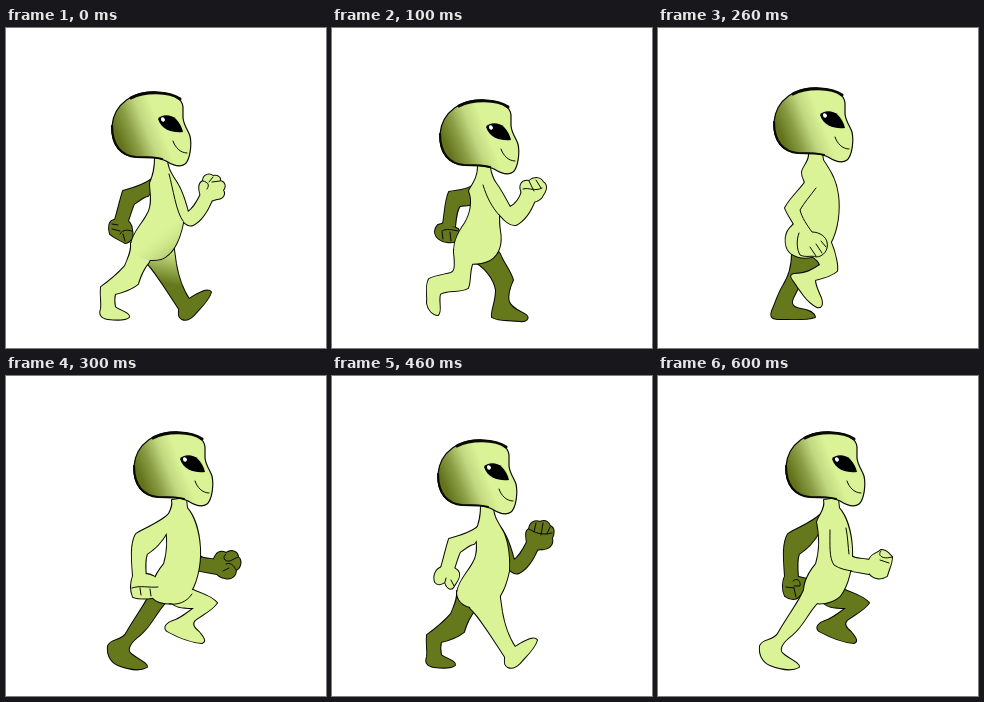
An HTML page with a canvas that plays this animation: 320 by 320 pixels, repeating every 700 ms.

```html
<!DOCTYPE html>
<html lang="en">
<head>
<meta charset="utf-8">
<title>Walking alien</title>
<style>
html, body { margin: 0; width: 100%; height: 100%; overflow: hidden; background: #fff; }
canvas { display: block; }
</style>
</head>
<body>
<canvas id="stage" width="320" height="320"></canvas>
<script>
const ctx = document.getElementById('stage').getContext('2d');
const LIGHT = '#dbf397', DARK = '#65781c', INK = '#080a02';
const STEP = 100;

// Body poses; each is used with the near and far limbs swapped.
const stride = {
  head: [0, 0],
  torso: 'M149,130C149,142 147,148 144,155C144,165 147,172 143,183C138,195 127,203 125,217C126,230 140,234 155,231C168,226 174,210 177,195C178,178 175,162 170,154C165,145 161,140 161,130Z',
  armBack: 'M147,150C140,156 128,160 117,163C114,172 112,182 109,192L122,193C124,187 126,180 128,176C134,172 138,168 142,168L148,160Z',
  armFwd: 'M163,146C172,152 178,168 182,184C188,180 192,172 195,166L206,172C201,184 195,193 187,197C182,199 176,194 172,185Z',
  legBack: 'M125,215C126,224 122,230 119,238C111,247 102,254 95,259C94,268 96,274 95,281C93,286 95,290 102,291C110,292 120,292 123,289C124,285 114,283 109,279C108,274 108,270 109,266C118,264 127,260 132,256C134,249 137,241 143,234L150,215Z',
  legFwd: 'M138,232C147,240 158,258 173,281C173,286 172,289 176,291C180,293 184,291 188,287C194,280 203,272 205,264C202,260 194,264 183,271C177,262 172,248 170,236L167,215L145,215Z'
};
const dip = {
  head: [2, 8],
  torso: 'M146,138C146,150 141,155 137,163C141,172 139,185 133,195C125,206 120,217 123,229C128,237 145,238 158,232C168,226 170,214 168,203C166,192 168,178 167,165C166,158 160,152 158,140Z',
  armBack: 'M140,158C132,163 124,162 117,164C113,173 113,185 111,196L123,199C124,188 125,181 128,178C132,177 137,178 139,176L146,162Z',
  armFwd: 'M158,148C166,156 172,168 178,179C184,176 188,170 190,163L203,172C199,183 192,193 184,197C178,198 172,192 167,186L158,170Z',
  legBack: 'M122,222C123,236 124,243 119,245C111,247 102,248 97,251C93,258 96,268 95,275C96,282 101,287 106,287C110,283 106,274 108,266C116,261 128,265 136,260C139,253 137,242 141,234L140,218Z',
  legFwd: 'M140,232C152,238 162,250 164,262C164,274 159,283 160,289C165,293 180,292 188,293C194,294 198,290 194,287C188,283 180,281 177,274C175,268 178,258 181,252C178,242 172,236 168,226L160,215L145,220Z'
};
const pass = {
  head: [10, -4],
  torso: 'M151,125C152,133 145,138 144,144C144,150 147,152 147,156L138,180C140,190 138,195 132,200C125,208 127,222 134,226C144,233 165,230 172,216C180,202 182,182 180,167C178,150 170,140 165,132L164,125Z',
  armBack: 'M150,150C144,160 132,170 127,180C130,188 137,196 141,206L154,204C149,197 144,190 142,182C146,175 152,168 158,160Z',
  armFwd: '',
  legBack: 'M134,226C134,240 130,250 125,258C120,266 118,274 114,283C112,289 114,291 122,291C134,291 150,292 157,289C156,285 150,282 143,281C136,280 132,277 135,270C139,262 142,256 146,248L160,240L162,225Z',
  legFwd: 'M150,226C156,229 161,233 162,237C154,242 148,246 136,246C132,247 133,249 135,252C142,262 149,274 159,279C164,280 165,276 163,270C160,263 157,257 157,252C165,250 173,248 179,243C180,238 178,226 172,212Z'
};
const push = {
  head: [22, -8],
  torso: 'M166,124C168,132 162,138 159,146C162,160 162,175 158,188C148,200 144,212 147,222C155,230 172,229 182,220C190,210 195,190 194,172C193,155 188,140 181,132L180,122Z',
  armBack: 'M163,138C155,146 140,152 130,158C124,168 126,185 127,200L140,202C139,190 139,183 141,178C150,172 156,165 160,158L168,148Z',
  armFwd: 'M172,150C172,165 171,182 176,189C186,195 200,196 211,198L212,184C203,182 196,184 191,178C190,165 190,152 184,142Z',
  legBack: 'M147,212C140,228 130,240 121,256C116,266 106,262 102,270C101,279 105,286 112,289C122,293 134,295 141,291C142,287 130,283 124,277C120,272 126,265 134,259C146,249 150,236 160,226L165,210Z',
  legFwd: 'M162,222C166,232 178,232 188,232C180,238 174,243 167,245C161,247 157,251 161,255C170,260 182,266 196,267C201,265 196,260 193,256C188,252 185,248 189,244C197,238 205,235 211,227C205,220 196,218 187,214L170,212Z'
};

// near: the light limbs; back / fwd: hands; far and front: ink lines below and above the body.
const steps = [
  { pose: stride, near: ['armFwd', 'legBack'], shade: true,
    back: 'M108,192C103,193 102,199 104,206C109,210 114,212 119,215C125,214 128,209 126,202C126,196 122,192 118,191Z',
    fwd: 'M195,168C192,160 193,155 197,153C197,147 203,145 207,148C212,147 215,150 214,153C219,154 220,159 217,162C220,167 216,171 211,171L204,173Z',
    far: 'M114,206C117,201 122,202 126,203M117,206L119,213M106,201L114,203M106,196L112,197',
    front: 'M163,146C167,160 170,184 177,193M197,153C202,154 204,157 201,161M207,149L203,154M214,153L206,154' },
  { pose: dip, near: ['armFwd', 'legBack'],
    back: 'M106,197C101,203 103,208 107,211C112,215 120,215 126,213C128,209 128,205 126,201L113,195Z',
    fwd: 'M190,165C186,157 190,152 197,153C203,148 209,150 211,154C216,157 214,163 211,167C209,172 203,175 197,173Z',
    far: 'M110,203C115,200 120,202 126,203M110,204L111,211M118,204L119,213',
    front: 'M151,157C155,170 160,179 167,187M197,153L202,163M204,152L209,160M191,161C197,159 203,164 210,160' },
  { pose: pass, near: ['armBack', 'legFwd'],
    back: 'M141,205C138,213 139,222 142,227C148,230 155,227 158,229C165,229 171,222 169,214C167,208 158,204 152,204Z',
    fwd: '', far: '',
    front: 'M158,160C152,168 146,175 142,182C144,190 149,197 154,204C162,204 168,209 169,214C171,222 165,229 158,229C155,227 148,230 142,227C139,222 138,213 141,205M152,219L158,228M158,216L164,225M163,213L168,219' },
  { pose: push, near: ['armBack', 'legFwd'],
    back: 'M127,200C124,208 125,216 127,221C133,223 143,223 149,221C154,217 153,207 150,202C144,197 135,197 127,200Z',
    fwd: 'M208,183C210,177 214,174 220,177C226,173 232,176 232,181C236,184 235,192 230,194C230,200 225,204 219,202C212,201 208,196 209,190Z',
    far: 'M220,178C216,181 218,186 224,185L232,181M220,188C224,186 228,189 230,194M217,195L223,192',
    front: 'M126,212C134,209 143,212 152,211M134,212L135,219M144,213L145,220M186,218C180,227 171,229 163,228' },
  { pose: stride, near: ['armBack', 'legFwd'],
    back: 'M110,191C104,193 101,199 103,206C106,210 110,208 113,206C114,211 119,216 122,210C124,206 128,203 127,197C125,192 119,190 110,191Z',
    fwd: 'M195,167C194,160 193,155 197,153C198,146 203,144 208,146C214,143 217,147 218,150C223,152 222,158 220,162C222,169 216,174 209,173L204,174Z',
    far: 'M197,153C202,156 209,160 220,157M204,147L202,156M211,147L209,159M218,151L215,158',
    front: 'M113,206L114,202M122,210L119,204' },
  { pose: dip, near: ['armBack', 'legFwd'],
    back: 'M108,193C101,195 99,201 102,207C105,211 109,209 112,208C113,214 117,217 120,213C126,211 128,203 124,198Z',
    fwd: 'M190,163C187,153 193,149 199,152C204,146 210,148 211,153C217,155 217,161 213,164C215,170 208,173 201,174Z',
    far: 'M191,158C195,153 200,157 199,162M199,152C205,153 206,158 203,161M211,154L205,157M213,163L206,160',
    front: 'M112,208L113,203M120,213L118,206' },
  { pose: push, near: ['armFwd', 'legBack'],
    back: 'M128,198C124,205 124,214 127,220C132,224 139,224 141,220C147,216 150,208 149,203Z',
    fwd: 'M211,184C214,177 219,178 223,174C229,174 231,178 234,181C234,188 231,192 229,200C223,204 215,203 211,197Z',
    far: 'M135,205C139,201 143,205 142,210L136,210M128,211L136,212M136,212L138,221',
    front: 'M172,154C172,169 171,182 176,189C182,193 188,194 194,195M191,178C190,171 190,162 188,152M223,175C219,179 224,184 234,181M222,184L231,187' }
];

const cache = {};
const path = d => cache[d] || (cache[d] = new Path2D(d));

function line(d, width = 1) {
  ctx.strokeStyle = INK;
  ctx.lineWidth = width;
  ctx.stroke(path(d));
}

function fill(d, color) {
  ctx.fillStyle = color;
  ctx.fill(path(d));
}

// Outlines first, fills second, so that joined parts show no seams.
function group(parts, color) {
  parts.forEach(d => line(d, 2));
  parts.forEach(d => fill(d, color));
}

function ramp(x0, y0, x1, y1, ...stops) {
  const g = ctx.createLinearGradient(x0, y0, x1, y1);
  stops.forEach((c, i) => g.addColorStop(i / (stops.length - 1), c));
  return g;
}

function drawHead([dx, dy]) {
  const skull = 'M177,79C176,69 166,65 150,64C128,63 108,75 106,98C105,118 115,128 130,129C145,129 153,129 160,133C168,138 174,140 179,136C184,132 186,117 184,108C182,102 178,98 177,90Z';
  ctx.save();
  ctx.translate(dx, dy);
  fill(skull, ramp(110, 104, 150, 88, '#62731b', '#8a9d45', '#c0d77f', LIGHT));
  line(skull, 1.2);
  line('M125,70C139,63 163,63 174,71', 3);
  line('M106,98C106,118 116,128 130,129C142,129 150,129 156,131', 2.2);
  fill('M152,91C155,86 165,86 170,91C174,95 176,100 177,104C168,105 156,103 152,91Z', '#000');
  fill('M155,91C155,88 159,89 159,92C158,95 155,94 155,91Z', '#fff');
  line('M167,113C169,119 174,125 181,125');
  ctx.restore();
}

function drawStep({ pose, near, back, fwd, far, front, shade }) {
  const farArm = near[0] === 'armFwd' ? 'armBack' : 'armFwd';
  const farLeg = near[1] === 'legFwd' ? 'legBack' : 'legFwd';
  const [nearHand, farHand] = near[0] === 'armFwd' ? [fwd, back] : [back, fwd];
  ctx.fillStyle = '#fff';
  ctx.fillRect(0, 0, 320, 320);
  group([pose[farArm], farHand], DARK);
  line(far);
  group([pose[farLeg]], shade ? ramp(169, 226, 163, 256, '#c8df82', DARK) : DARK);
  group([pose.torso, pose[near[1]], pose[near[0]], nearHand], LIGHT);
  if (shade) fill(pose.torso, ramp(150, 204, 167, 226, '#daf39800', '#a3b85eb0'));
  line(front);
  drawHead(pose.head);
}

function tick() {
  drawStep(steps[Math.floor(performance.now() / STEP) % steps.length]);
  requestAnimationFrame(tick);
}
ctx.lineJoin = ctx.lineCap = 'round';
tick();
</script>
</body>
</html>
```
